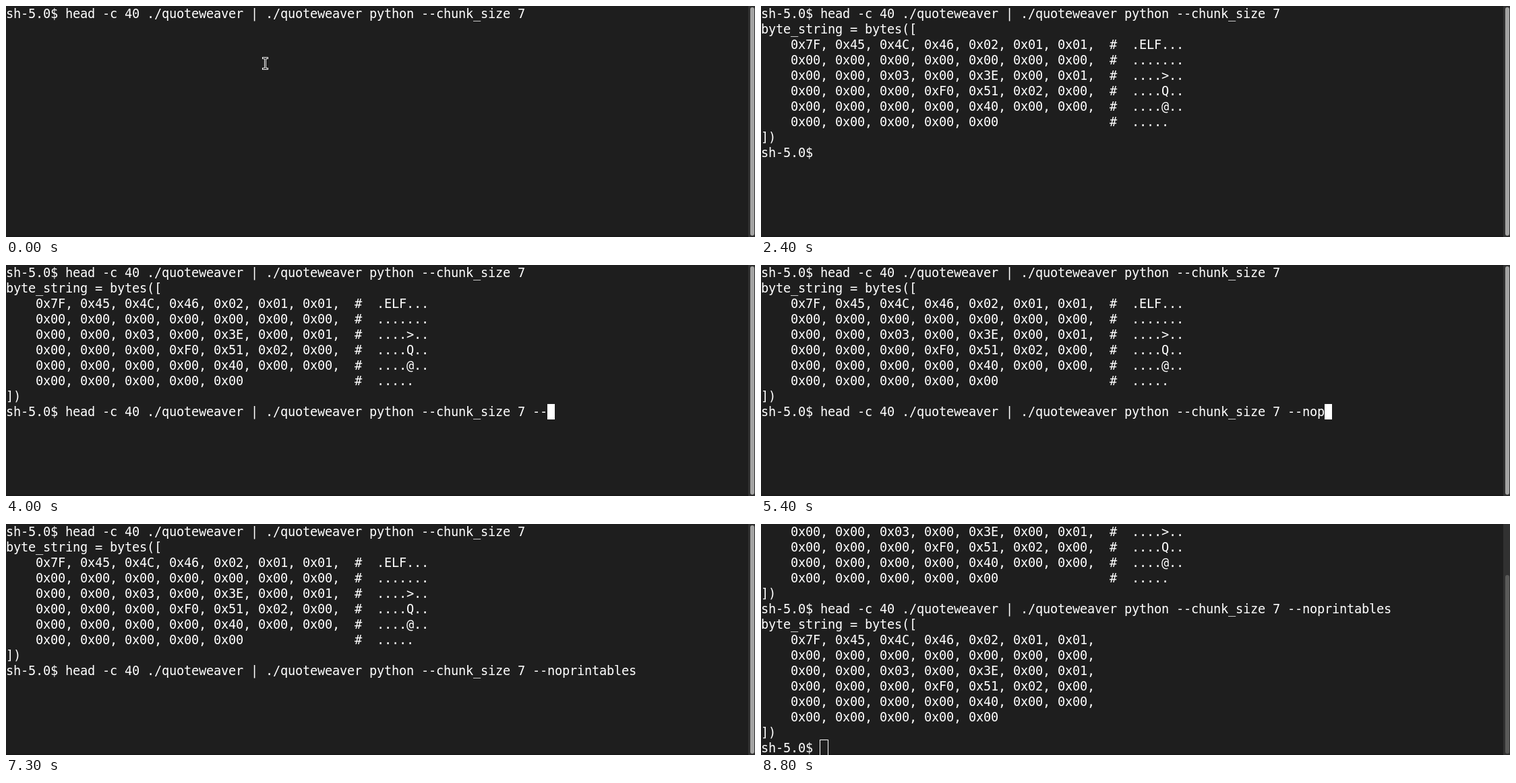
These frames come from a looping animation (1111 px wide and 344 px high, 9000 ms). An HTML page:

```html
<!DOCTYPE html>
<html lang="en">
<head>
<meta charset="utf-8">
<title>Terminal</title>
<style>
  html, body { margin: 0; width: 100%; height: 100%; overflow: hidden; background: #1e1e1e; }
  #stage { position: relative; width: 1111px; height: 344px; overflow: hidden; background: #1e1e1e; }
  #stage > * { position: absolute; box-sizing: border-box; }
  #edge { left: 0; top: 342px; width: 1101px; height: 2px; background: #191919; }
  #screen {
    left: 0; top: 0; margin: 0; color: #fff; white-space: pre;
    font: 14pt/23px "DejaVu Sans Mono", monospace;
    letter-spacing: calc(11px - 1ch); /* whole-pixel character cells */
    font-variant-ligatures: none;
  }
  #caret { width: 11px; height: 23px; background: #fff; }
  #caret.hollow { width: 13px; height: 25px; margin: -1px; background: none; border: 1px solid #fff; }
  #trough { left: 1101px; top: 0; width: 10px; height: 344px; background: #313131; }
  #slider { left: 1104px; width: 6px; border-radius: 3px; background: #a4a4a3; }
  #slider.dim { background: #5a5a59; }
  #pointer { left: 0; top: 0; width: 9px; height: 19px; fill: none; }
</style>
</head>
<body>
<div id="stage">
  <div id="edge"></div>
  <pre id="screen"></pre>
  <div id="caret"></div>
  <div id="trough"></div>
  <div id="slider"></div>
  <svg id="pointer" viewBox="0 0 9 19">
    <path stroke="#fff" stroke-width="3" d="M0 1.5H9M4.5 1.5V17.5M0 17.5H9"/>
    <path stroke="#000" d="M1 1.5H8M4.5 1.5V17.5M1 17.5H8"/>
  </svg>
</div>
<script>
const LOOP = 9000, CELL = 11, LINE = 23;
const PROMPT = 'sh-5.0$ ';
const COMMAND = 'head -c 40 ./quoteweaver | ./quoteweaver python --chunk_size 7';
const OPTION = ' --noprintables';

const FIRST_RUN = 600, RECALL = 2900, SECOND_RUN = 7400, BLUR = 8800;
const keyTimes = [3500, 3800, 4000, 5000, 5100, 5400, 5700, 5800, 5800, 5900,
                  6100, 6300, 6400, 6500, 6700];
const caretHidden = [[0, 100], [500, 600], [1200, 1800], [2400, 2900],
                     [4500, 5000], [7300, 7400], [8000, 8600]];
// start, end, x, y
const pointerStops = [[0, 500, 380, 76], [8000, 8100, 360, 58],
                      [8100, 8200, 352, 28], [8200, 8300, 346, 0]];

const bytes = new Array(40).fill(0);
[0x7F, 0x45, 0x4C, 0x46, 2, 1, 1].forEach((b, i) => bytes[i] = b);
Object.assign(bytes, { 16: 3, 18: 0x3E, 20: 1, 24: 0xF0, 25: 0x51, 26: 2, 32: 0x40 });

const hex = b => '0x' + b.toString(16).toUpperCase().padStart(2, '0');
const printable = b => b > 32 && b < 127 ? String.fromCharCode(b) : '.';

function dump(withText) {
  const rows = ['byte_string = bytes(['];
  for (let i = 0; i < bytes.length; i += 7) {
    const chunk = bytes.slice(i, i + 7);
    const row = '    ' + chunk.map(hex).join(', ') + (i + 7 < bytes.length ? ',' : '');
    rows.push(withText ? row.padEnd(47) + '#  ' + chunk.map(printable).join('') : row);
  }
  return [...rows, '])'];
}
const listing = dump(true), plainListing = dump(false);

function linesAt(t) {
  const lines = [PROMPT + COMMAND];
  if (t < FIRST_RUN) return lines;
  const typed = keyTimes.filter(k => k <= t).length;
  const entry = t < RECALL ? '' : COMMAND + OPTION.slice(0, typed);
  lines.push(...listing, PROMPT + entry);
  if (t >= SECOND_RUN) lines.push(...plainListing, PROMPT);
  return lines;
}

const during = t => ([start, end]) => t >= start && t < end;
const [screenEl, caret, slider, pointer] =
  ['screen', 'caret', 'slider', 'pointer'].map(id => document.getElementById(id));
let shown = '';

function draw(now) {
  const t = now % LOOP;
  const scrolled = t >= SECOND_RUN, blurred = t >= BLUR;
  const lines = linesAt(t).slice(scrolled ? 4 : 0);
  const text = lines.join('\n');
  if (text !== shown) screenEl.textContent = shown = text;

  caret.style.left = lines[lines.length - 1].length * CELL + 'px';
  caret.style.top = (lines.length - 1) * LINE + 'px';
  caret.style.display = caretHidden.some(during(t)) ? 'none' : 'block';
  caret.className = blurred ? 'hollow' : '';

  const top = scrolled ? 76 : 2;
  slider.style.top = top + 'px';
  slider.style.height = 342 - top + 'px';
  slider.className = blurred ? 'dim' : '';

  const stop = pointerStops.find(during(t));
  pointer.style.display = stop ? 'block' : 'none';
  if (stop) pointer.style.transform = `translate(${stop[2]}px, ${stop[3]}px)`;
}

function tick() {
  draw(performance.now());
  requestAnimationFrame(tick);
}
tick();
</script>
</body>
</html>
```
